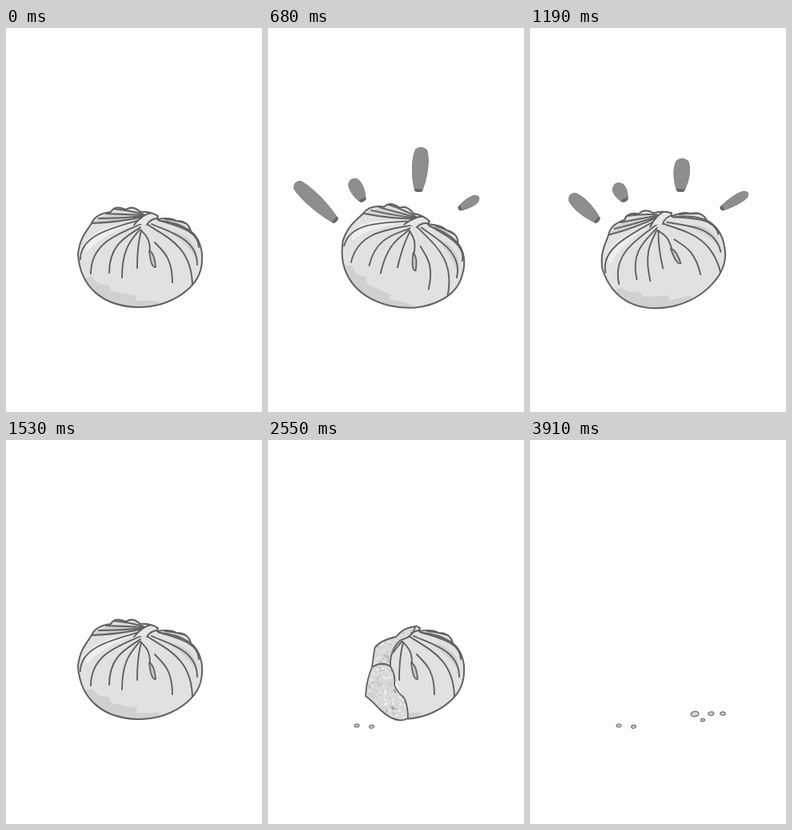
Write an HTML page with a canvas that moves like this. It is 320x480 px and loops after 4.42 s.

```html
<!DOCTYPE html>
<html lang="en">
<head>
<meta charset="utf-8">
<title>Steamed bun</title>
<style>
  html, body { margin: 0; width: 100%; height: 100%; overflow: hidden; background: #fefefe; }
  canvas { display: block; width: 100vw; height: 100vh; }
</style>
</head>
<body>
<canvas id="stage" width="320" height="480"></canvas>
<script>
const ctx = document.getElementById('stage').getContext('2d');
const TICK = 170, TICKS = 26;
const PAPER = '#fefefe', INK = '#606060', SHADE = '#d0d0d0';

const shape = d => new Path2D(d);

function paint(path, fill, stroke, width = 2) {
  if (fill) { ctx.fillStyle = fill; ctx.fill(path); }
  if (stroke) { ctx.strokeStyle = stroke; ctx.lineWidth = width; ctx.stroke(path); }
}

function within(path, drawInside) {
  ctx.save();
  ctx.clip(path);
  drawInside();
  ctx.restore();
}

const outline = shape('M90 283C92 262 101 254 107 244Q112 232 131 230Q136 221 150 227Q158 221 168 230Q180 229 190 235L189 239Q205 236 213 241Q228 241 231 254C241 262 246 276 245 290C245 325 205 349 165 349C122 348 93 325 90 283Z');
const knot = shape('M160 246Q172 232 182 231Q190 232 190 238Q181 238 176 246Q168 244 160 246Z');
const ridge = shape('M160 246Q172 232 182 231Q190 232 190 238Q181 238 176 246');
const slit = shape('M179 278Q186 282 187 299Q181 300 179 278Z');
const highlight = shape('M98 270Q110 248 162 243Q120 258 101 280Z');
const backShade = shape('M105 246Q132 222 172 235Q140 243 105 246ZM192 240Q216 236 231 256Z');
const sideShade = shape('M202 254Q238 256 240 292Q228 270 202 254Z');
const baseShade = shape('M98 313L108 311Q114 322 128 321L132 329Q146 332 164 335L162 341L192 341L186 352L98 352Z');
const glint = shape('M198 321Q206 317 214 322');

// A pleat leaves the knot sideways and then drops to its end.
function pleat(x, y, endX, endY) {
  const path = new Path2D();
  const drop = endY - y;
  path.moveTo(x, y);
  path.bezierCurveTo(x + (endX - x) * .4, y + drop * .2, endX, y + drop * .35, endX, endY);
  return path;
}

const pleats = [
  pleat(174, 238, 93, 289), pleat(173, 243, 106, 307), pleat(168, 249, 129, 306),
  pleat(167, 252, 145, 312), pleat(169, 253, 164, 300), pleat(168, 252, 180, 279),
  pleat(186, 268, 208, 318), pleat(176, 245, 233, 323), pleat(182, 245, 239, 296),
  pleat(190, 240, 241, 274)
];
for (let i = 0; i < 4; i++) {
  pleats.push(shape(`M${107 + 9 * i} ${244 - 6 * i}Q${140 + 5 * i} ${243 - 5 * i} 172 ${236 - i}`));
}
for (let i = 0; i < 2; i++) {
  pleats.push(shape(`M${192 + 7 * i} ${241 - 2 * i}Q${211 + 4 * i} ${242 - 2 * i} 230 ${253 - 7 * i}`));
}

function bun(degrees) {
  ctx.save();
  ctx.translate(167, 290.5);
  ctx.rotate(degrees * Math.PI / 180);
  ctx.translate(-167, -290.5);
  paint(outline, '#e1e1e1');
  within(outline, () => {
    [backShade, sideShade, baseShade].forEach(path => paint(path, SHADE));
    paint(highlight, '#efefef');
    pleats.forEach(path => paint(path, null, INK, 1.9));
    paint(knot, '#e6e6e6');
    paint(ridge, null, INK, 1.9);
    paint(slit, '#c5c5c5', INK, 1.7);
  });
  paint(outline, null, INK);
  ctx.restore();
}

// Each ray: root, direction, shortest length, growth, half width.
const rays = [
  { x: 85, y: 241, degrees: -137, length: 16, growth: 61, width: 9 },
  { x: 119, y: 216, degrees: -118, length: 16, growth: 17, width: 8.5 },
  { x: 188, y: 204, degrees: -86, length: 21, growth: 39, width: 10 },
  { x: 239, y: 226, degrees: -31, length: 22, growth: 8, width: 6 }
];

function burst(step) {
  const power = 1 - Math.abs(step - 4.6) * .2;
  const fading = step >= 4;
  rays.forEach(({ x, y, degrees, length, growth, width }, i) => {
    const size = (length + growth * power) * (i === 3 && step % 2 ? 1.5 : 1);
    const tip = width * .45, side = width * 1.15;
    const ray = shape(`M0 ${-tip}C${size * .35} ${-side} ${size * .8} ${-side} ${size - 3} ${-width * .7}
      Q${size + 3} 0 ${size - 3} ${width * .7}C${size * .8} ${side} ${size * .35} ${side} 0 ${tip}Q-2 0 0 ${-tip}Z`);
    ctx.save();
    ctx.translate(x, y);
    ctx.rotate(degrees * Math.PI / 180);
    paint(ray, fading ? '#8e8e8e' : '#949494');
    if (fading) {
      within(ray, () => {
        paint(ray, null, '#7c7c7c', 1);
        ctx.fillStyle = '#686868';
        ctx.fillRect(-3, -width, 6, width * 2);
      });
    }
    ctx.restore();
  });
}

// What each bite removes, and the torn filling it exposes.
const bites = [
  {
    tick: 12,
    gone: shape('M80 256H97L130 270L158 290L160 310L174 335V370H80Z'),
    face: shape('M97 255Q110 252 118 267Q145 264 157 284Q160 292 158 303Q162 316 171 324Q175 333 174 348Q155 351 138 334Q122 322 118 310Q104 300 103 277Z')
  },
  {
    tick: 15,
    gone: shape('M80 200H184V235L158 258L152 280L158 300L174 335V370H80Z'),
    face: shape('M184 233Q170 234 160 246Q135 252 133 262L130 284Q143 276 153 283Q152 262 166 250Q182 246 184 233ZM130 284Q143 276 153 283Q160 294 158 306Q162 316 170 322Q175 332 175 348Q160 356 139 336Q130 326 122 320Q123 300 130 284Z')
  },
  {
    tick: 17,
    gone: shape('M80 200H187V240L180 264L178 290L186 320L196 335V370H80Z'),
    face: shape('M186 234Q172 238 168 254Q157 274 154 296Q148 308 133 315Q132 328 153 344Q170 354 196 346Q198 330 187 321Q176 304 180 288Q174 266 188 244Z')
  },
  {
    tick: 20,
    gone: shape('M80 200H260V271L242 273L228 290L218 310L216 335V370H80Z'),
    face: shape('M244 272Q232 274 219 288Q214 300 202 306Q198 320 188 324Q184 338 195 343Q207 343 219 337Q214 322 223 309Q226 294 244 272Z')
  }
];

function speckle() {
  let seed = 7;
  const random = () => (seed = seed * 16807 % 2147483647) / 2147483647;
  const tones = ['#bcbcbc', '#c8c8c8', '#f0f0f0', '#e8e8e8', '#d0d0d0'];
  for (let i = 0; i < 1200; i++) {
    ctx.fillStyle = i % 45 ? tones[i % tones.length] : '#7c7c7c';
    ctx.beginPath();
    ctx.ellipse(92 + random() * 158, 228 + random() * 128,
      .6 + random() * 1.7, .6 + random() * 1.2, random() * 3, 0, 7);
    ctx.fill();
  }
}

function bitten({ gone, face }) {
  bun(0);
  paint(gone, PAPER, PAPER, 1);
  paint(face, '#d9d9d9');
  within(face, speckle);
  paint(face, null, INK, 1.8);
}

function crumb(x, y, size) {
  const path = new Path2D();
  path.ellipse(x, y, size, size * .65, -.15, 0, 7);
  paint(path, '#d2d2d2', '#6c6c6c', 1.2);
}

function draw(time) {
  const tick = Math.floor(time / TICK) % TICKS;
  const bite = bites.findLast(b => b.tick <= tick);
  const eaten = tick >= 23;
  ctx.fillStyle = PAPER;
  ctx.fillRect(0, 0, 320, 480);
  ctx.lineCap = ctx.lineJoin = 'round';

  if (tick >= 1 && tick <= 8) {
    const step = Math.min(tick, 7);
    burst(step);
    bun(step % 2 ? -13 : 13);
  } else if (!bite) {
    bun(0);
  } else {
    if (!eaten) bitten(bite);
    if (bite === bites[0]) paint(glint, null, '#fafafa', 1.3);
    crumb(111, 357, 3);
    crumb(129.5, 358.3, 3);
    if (tick >= 17 && !eaten) crumb(216, 385.5, 3.5);
    if (eaten) {
      crumb(206, 342.5, 5);
      crumb(226.3, 342, 3.5);
      crumb(241, 342, 3.2);
      crumb(216, 350, 2.6);
    }
  }
}

function animate() {
  draw(performance.now());
  requestAnimationFrame(animate);
}
animate();
</script>
</body>
</html>
```
